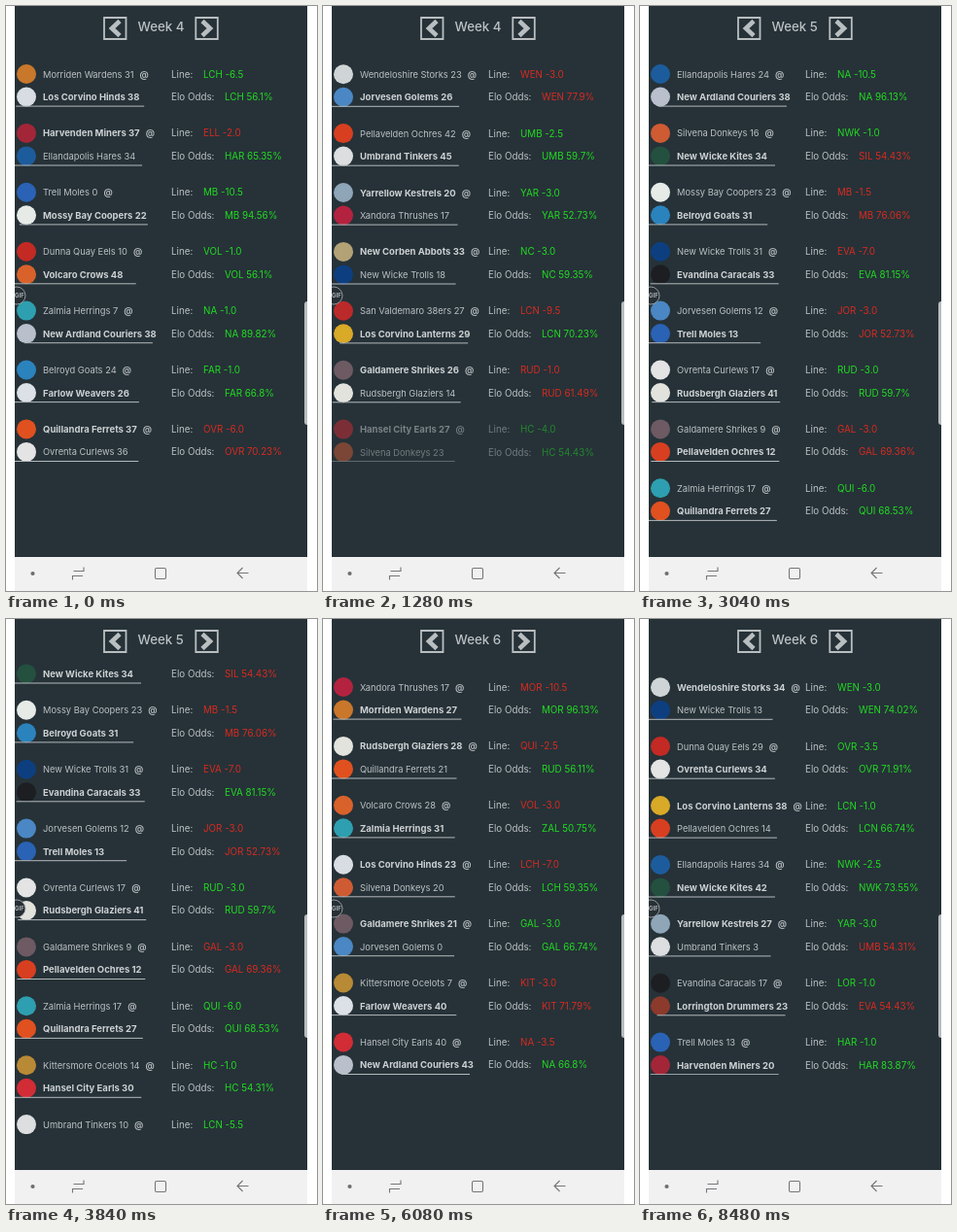
An HTML page for the animation above (9.6 s loop, 320 by 602 pixels).

```html
<!DOCTYPE html>
<html lang="en">
<head>
<meta charset="utf-8">
<title>Weekly picks</title>
<style>
  html, body { margin: 0; width: 100%; height: 100%; overflow: hidden; background: #fff; }
  svg { display: block; width: 320px; height: 602px; }
  text { font: 9.3px Inter, "Open Sans", sans-serif; fill: #bcc1c4; white-space: pre; }
  .win { font-size: 9.5px; font-weight: 700; fill: #cdd1d3; }
  .at { font-size: 9.3px; font-weight: 600; fill: #bcc1c4; }
  .label, .good, .bad { font-size: 9.8px; }
  .good { fill: #22dc22; }
  .bad { fill: #d92a20; }
  .rule { stroke: #b4b9bc; stroke-width: 1; }
  .icon { fill: none; stroke: #747678; stroke-width: 1.1; }
  .button { fill: none; stroke: #b9bec1; }
  #title { font-size: 13.3px; font-weight: 500; }
</style>
</head>
<body>
<svg viewBox="0 0 320 602">
  <clipPath id="window"><rect id="view" x="9" y="43" width="301" height="426"/></clipPath>
  <clipPath id="screen"><rect x="9" width="301" height="602"/></clipPath>
  <rect x="9" width="301" height="567" fill="#263238"/>
  <g class="button">
    <path d="M101 12h22.500v22h-22.500zM195.300 12h22.500v22h-22.500z" stroke-width="1.8"/>
    <path d="M117 15.500l-8 7.500 8 7.500M202 15.500l8 7.500-8 7.500" stroke-width="4.6"/>
  </g>
  <text id="title" x="135.5" y="26"></text>
  <g id="lists" clip-path="url(#window)"></g>
  <g clip-path="url(#screen)">
    <circle cx="11" cy="298" r="9" fill="#273035" stroke="#aeb3b5" stroke-width=".8"/>
    <text x="9" y="300.3" style="font-size:6px;font-weight:600">GIF</text>
    <rect x="307" y="304" width="6" height="127" rx="3" fill="#b8bcbe"/>
  </g>
  <rect x="9" y="567" width="301" height="35" fill="#f1f1f1"/>
  <circle cx="27.5" cy="584" r="2.1" fill="#6d6f71"/>
  <path class="icon" d="M80 577.5v4h-10.5M68.5 590.5v-4h10.5M155 578.5h8q1.500 0 1.500 1.500v8q0 1.500-1.500 1.500h-8q-1.500 0-1.500-1.500v-8q0-1.500 1.500-1.500zM249.500 583.500h-11.500m5.500-5.500l-5.500 5.500 5.500 5.500"/>
</svg>
<script>
const PITCH = 60.9, STEP = 160, LOOP = 9600;

// code: name, badge colour
const teams = {
  MOR: ["Morriden Wardens", "#c9772b"], LCH: ["Los Corvino Hinds", "#d8dde3"],
  LCN: ["Los Corvino Lanterns", "#d9a928"], HAR: ["Harvenden Miners", "#a32638"],
  ELL: ["Ellandapolis Hares", "#1d5c9c"], TRE: ["Trell Moles", "#2a62b5"],
  MB: ["Mossy Bay Coopers", "#e6ebe8"], DQ: ["Dunna Quay Eels", "#c32a24"],
  VOL: ["Volcaro Crows", "#d9622b"], ZAL: ["Zalmia Herrings", "#2e9fb0"],
  NA: ["New Ardland Couriers", "#b9c0cc"], BEL: ["Belroyd Goats", "#2b83bd"],
  FAR: ["Farlow Weavers", "#dce1e8"], QUI: ["Quillandra Ferrets", "#e0511f"],
  OVR: ["Ovrenta Curlews", "#e4e4e4"], WEN: ["Wendeloshire Storks", "#cfd5d6"],
  JOR: ["Jorvesen Golems", "#4a87c4"], PEL: ["Pellavelden Ochres", "#d83f20"],
  UMB: ["Umbrand Tinkers", "#dcdedf"], YAR: ["Yarrellow Kestrels", "#8fa5b8"],
  XAN: ["Xandora Thrushes", "#b3233f"], NC: ["New Corben Abbots", "#b3a276"],
  NWT: ["New Wicke Trolls", "#0d3f80"], NWK: ["New Wicke Kites", "#24503f"],
  SV: ["San Valdemaro 38ers", "#bb2a2a"], GAL: ["Galdamere Shrikes", "#6d5a63"],
  RUD: ["Rudsbergh Glaziers", "#e3e3dd"], HC: ["Hansel City Earls", "#d22c36"],
  SIL: ["Silvena Donkeys", "#cf5b33"], EVA: ["Evandina Caracals", "#1c1e22"],
  KIT: ["Kittersmore Ocelots", "#b98a35"], LOR: ["Lorrington Drummers", "#8c3a2c"]
};

// away score, home score, favourite and its line, predicted winner and odds
const weeks = [
  { label: "Week 4", height: 426, games: `
    MOR 31 LCH 38 LCH 6.5 LCH 56.1
    HAR 37 ELL 34 ELL 2.0 HAR 65.35
    TRE 0 MB 22 MB 10.5 MB 94.56
    DQ 10 VOL 48 VOL 1.0 VOL 56.1
    ZAL 7 NA 38 NA 1.0 NA 89.82
    BEL 24 FAR 26 FAR 1.0 FAR 66.8
    QUI 37 OVR 36 OVR 6.0 OVR 70.23
    NWK 12 KIT 31 KIT 7.5 KIT 75.4
    WEN 23 JOR 26 WEN 3.0 WEN 77.9
    PEL 42 UMB 45 UMB 2.5 UMB 59.7
    YAR 20 XAN 17 YAR 3.0 YAR 52.73
    NC 33 NWT 18 NC 3.0 NC 59.35
    SV 27 LCN 29 LCN 9.5 LCN 70.23
    GAL 26 RUD 14 RUD 1.0 RUD 61.49
    HC 27 SIL 23 HC 4.0 HC 54.43` },
  { label: "Week 5", height: 487, games: `
    ELL 24 NA 38 NA 10.5 NA 96.13
    SIL 16 NWK 34 NWK 1.0 SIL 54.43
    MB 23 BEL 31 MB 1.5 MB 76.06
    NWT 31 EVA 33 EVA 7.0 EVA 81.15
    JOR 12 TRE 13 JOR 3.0 JOR 52.73
    OVR 17 RUD 41 RUD 3.0 RUD 59.7
    GAL 9 PEL 12 GAL 3.0 GAL 69.36
    ZAL 17 QUI 27 QUI 6.0 QUI 68.53
    KIT 14 HC 30 HC 1.0 HC 54.31
    UMB 10 LCN 26 LCN 5.5 LCN 81.15
    MOR 23 WEN 21 WEN 3.0 WEN 61.49
    LCH 33 YAR 31 LCH 7.0 LCH 74.02
    XAN 28 SV 18 SV 4.0 SV 58.2
    FAR 16 HAR 19 HAR 3.0 HAR 55.1
    LOR 19 NC 43 NC 6.5 NC 70.4` },
  { label: "Week 6", height: 426, games: `
    XAN 17 MOR 27 MOR 10.5 MOR 96.13
    RUD 28 QUI 21 QUI 2.5 RUD 56.11
    VOL 28 ZAL 31 VOL 3.0 ZAL 50.75
    LCH 23 SIL 20 LCH 7.0 LCH 59.35
    GAL 21 JOR 0 GAL 3.0 GAL 66.74
    KIT 7 FAR 40 KIT 3.0 KIT 71.79
    HC 40 NA 43 NA 3.5 NA 66.8
    SV 30 MB 33 MB 9.5 MB 81.13
    WEN 34 NWT 13 WEN 3.0 WEN 74.02
    DQ 29 OVR 34 OVR 3.5 OVR 71.91
    LCN 38 PEL 14 LCN 1.0 LCN 66.74
    ELL 34 NWK 42 NWK 2.5 NWK 73.55
    YAR 27 UMB 3 YAR 3.0 UMB 54.31
    EVA 17 LOR 23 LOR 1.0 EVA 54.43
    TRE 13 HAR 20 HAR 1.0 HAR 83.87` }
];

// [time, scroll offset], eased between neighbours
const scroll = [
  [0, 0], [160, 0], [1280, 487], [1440, 487], [2400, 0], [2559, 0],
  [2560, 0], [3360, 0], [4480, 249], [4960, 426], [5759, 426],
  [5760, 0], [6720, 0], [7040, 36], [7520, 36], [7680, 48.8], [8480, 487], [LOOP, 487]
];

const $ = id => document.getElementById(id);
const clamp = x => Math.max(0, Math.min(1, x));

function add(parent, tag, attrs, content) {
  const el = document.createElementNS("http://www.w3.org/2000/svg", tag);
  for (const key in attrs) el.setAttribute(key, attrs[key]);
  if (content) el.textContent = content;
  return parent.appendChild(el);
}

function addTeam(row, code, score, won, y) {
  const [name, colour] = teams[code];
  add(row, "circle", { cx: 21, cy: y, r: 10, fill: colour });
  return add(row, "text", { x: 38, y: y + 3.5, class: won ? "win" : "" }, `${name} ${score}`);
}

function addGame(list, line, i) {
  const [away, a, home, h, fav, spread, pick, odds] = line.trim().split(" ");
  const row = add(list, "g", { transform: `translate(0 ${43 + i * PITCH})` });
  const margin = code => code === home ? h - a : a - h;
  const tone = ok => ok ? "good" : "bad";

  const top = addTeam(row, away, a, margin(away) > 0, 27);
  add(top, "tspan", { dx: 6, class: "at" }, "@");
  const bottom = addTeam(row, home, h, margin(home) > 0, 50.5);
  const right = (38 + bottom.getComputedTextLength()) / 2 + 73.5;
  add(row, "path", { class: "rule", d: `M${right - 132} 60.1H${right}` });

  add(row, "text", { x: 170, y: 30.5, class: "label" }, "Line:");
  add(row, "text", { x: 203, y: 30.5, class: tone(margin(fav) >= +spread) }, `${fav} -${spread}`);
  add(row, "text", { x: 170, y: 54, class: "label" }, "Elo Odds:");
  add(row, "text", { x: 225, y: 54, class: tone(margin(pick) > 0) }, `${pick} ${odds}%`);
  return row;
}

for (const week of weeks) {
  week.list = add($("lists"), "g", {});
  week.rows = week.games.trim().split("\n").map((line, i) => addGame(week.list, line, i));
}

function offsetAt(t) {
  const k = scroll.findIndex(([time]) => time > t);
  const [t0, y0] = scroll[k - 1], [t1, y1] = scroll[k];
  const p = (t - t0) / (t1 - t0);
  return y0 + (y1 - y0) * p * p * (3 - 2 * p);
}

// Rows fade in one after another when a week opens
function alphaAt(w, i, t) {
  if (w === 0) return i === 14 ? clamp((t - 1120) / 320) : 1;
  return clamp((t - (w === 1 ? 2640 : 5760) - i * 15) / 200);
}

function draw(now) {
  const t = Math.floor(now % LOOP / STEP) * STEP;
  const current = t < 2560 ? 0 : t < 5760 ? 1 : 2;
  const week = weeks[current];
  $("title").textContent = week.label;
  $("view").setAttribute("height", week.height);
  weeks.forEach((each, w) => each.list.setAttribute("display", w === current ? "inline" : "none"));
  week.list.setAttribute("transform", `translate(0 ${-offsetAt(t)})`);
  week.rows.forEach((row, i) => row.setAttribute("opacity", alphaAt(current, i, t)));
}

const start = performance.now();
function tick() {
  draw(performance.now() - start);
  requestAnimationFrame(tick);
}
tick();
</script>
</body>
</html>
```
